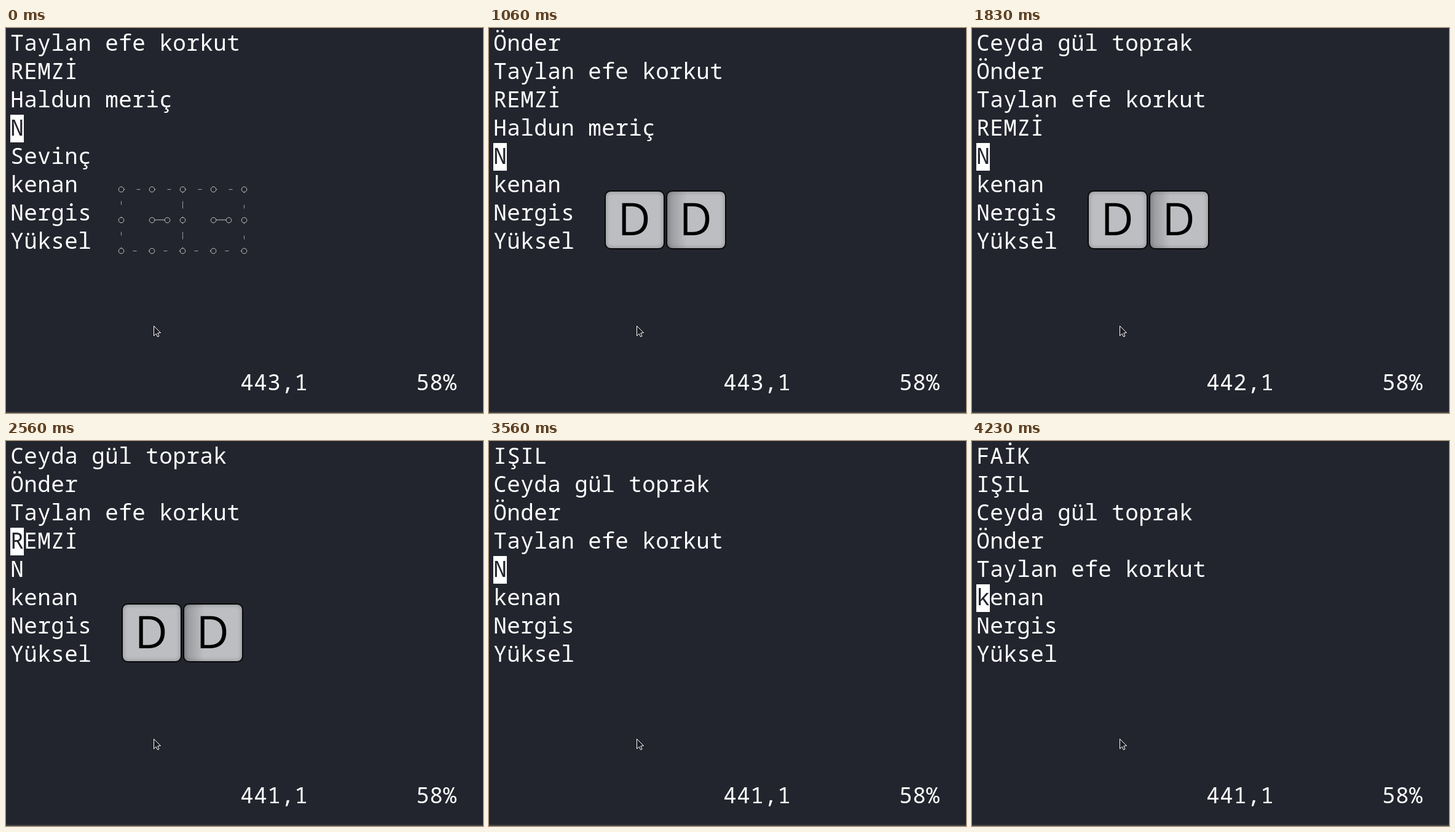
These frames come from a looping animation (776 by 626 pixels, 5110 ms). An HTML page with a canvas:

```html
<!DOCTYPE html>
<html lang="tr">
<head>
<meta charset="utf-8">
<title>Terminal editing</title>
<style>
html, body { margin: 0; width: 100%; height: 100%; overflow: hidden; background: #23252e; }
canvas { display: block; }
</style>
</head>
<body>
<canvas id="stage" width="776" height="626"></canvas>
<script>
const ctx = document.getElementById('stage').getContext('2d');
const LOOP = 5110, BG = '#23252e', FG = '#ffffff';
const CELL = 22, ROW = 46, LEFT = 7, TOP = 3, VISIBLE = 8, FIRST_LINE = 436;

const names = [
  'FAİK', 'IŞIL', 'Ceyda gül toprak', 'Önder', 'Taylan efe korkut', 'REMZİ',
  'Haldun meriç', 'N', 'Sevinç', 'kenan', 'Nergis', 'Yüksel'
];

const actions = {
  up: s => s.cursor--,
  down: s => s.cursor++,
  pending: s => s.command = 'd',
  remove: s => { s.lines.splice(s.cursor, 1); s.command = ''; },
  outline: s => s.overlay = drawOutline,
  keys: s => s.overlay = drawKeys,
  clear: s => s.overlay = null
};

const events = [
  [0, 'outline'], [70, 'clear', 'down'],
  [270, 'pending'], [460, 'remove'], [530, 'keys'],
  [1060, 'up'], [1200, 'up'], [1330, 'clear'],
  [1700, 'pending'], [1830, 'remove', 'keys'],
  [2560, 'up'], [2630, 'clear'],
  [2900, 'pending'], [3100, 'remove', 'keys'],
  [3560, 'clear'], [3630, 'pending'], [3760, 'remove'], [3830, 'keys'],
  [4230, 'clear']
];

function stateAt(time) {
  const state = { lines: [...names], cursor: 7, command: '', overlay: null };
  for (const [start, ...list] of events) {
    if (start > time) break;
    list.forEach(name => actions[name](state));
  }
  return state;
}

// Each character sits in the middle of its terminal cell.
function write(text, col, row, color = FG) {
  ctx.font = '36px "Noto Sans Mono", monospace';
  ctx.textAlign = 'center';
  ctx.textBaseline = 'alphabetic';
  ctx.fillStyle = color;
  [...text].forEach((ch, i) =>
    ctx.fillText(ch, LEFT + (col + i + 0.5) * CELL, TOP + row * ROW + 34));
}

function roundBox(x, y, w, h, r) {
  ctx.beginPath();
  ctx.roundRect(x, y, w, h, r);
}

function drawKey(x, shaded) {
  const y = 264;
  ctx.fillStyle = '#08080a';
  roundBox(x, y, 98, 96, 10);
  ctx.fill();

  ctx.save();
  roundBox(x + 2, y + 2, 94, 92, 8);
  ctx.fillStyle = '#bdbec2';
  ctx.fill();
  ctx.clip();
  if (shaded) {
    const shade = ctx.createLinearGradient(x + 2, 0, x + 34, 0);
    shade.addColorStop(0, 'rgba(0,0,0,.22)');
    shade.addColorStop(1, 'rgba(0,0,0,0)');
    ctx.fillStyle = shade;
    ctx.fillRect(x, y, 40, 96);
  }
  ctx.strokeStyle = 'rgba(40,40,45,.8)';
  ctx.shadowColor = 'rgba(0,0,0,.65)';
  ctx.shadowBlur = 6;
  ctx.lineWidth = 2;
  roundBox(x + 1, y + 1, 96, 94, 9);
  ctx.stroke();
  ctx.restore();

  ctx.font = '73px "Open Sans", sans-serif';
  ctx.textAlign = 'left';
  ctx.fillStyle = '#000';
  ctx.fillText('D', x + 21.5, y + 73);
}

function drawKeys() {
  drawKey(188, false);
  drawKey(288, true);
}

function drawOutline() {
  ctx.save();
  ctx.strokeStyle = '#a2a3a8';
  ctx.lineWidth = 1;
  ctx.setLineDash([6, 19]);
  for (const x of [187.5, 287.5]) ctx.strokeRect(x, 262.5, 100, 100);
  ctx.setLineDash([]);
  ctx.strokeStyle = '#c4c5c9';
  for (const x of [237.5, 337.5]) {
    ctx.beginPath();
    ctx.moveTo(x, 312);
    ctx.lineTo(x + 25, 312);
    ctx.stroke();
  }
  ctx.fillStyle = BG;
  const handle = (x, y) => {
    ctx.beginPath();
    ctx.arc(x, y, 4.3, 0, Math.PI * 2);
    ctx.fill();
    ctx.stroke();
  };
  for (let row = 0; row < 3; row++)
    for (let col = 0; col < 5; col++) handle(187.5 + col * 50, 262.5 + row * 50);
  handle(262.5, 312.5);
  handle(362.5, 312.5);
  ctx.restore();
}

function drawPointer() {
  ctx.save();
  ctx.translate(240.5, 484.5);
  ctx.beginPath();
  ctx.moveTo(0, 0);
  for (const [x, y] of [[0, 16], [3.7, 12.6], [6, 17.5], [8.5, 16.5], [6.3, 11.5], [11, 11]])
    ctx.lineTo(x, y);
  ctx.closePath();
  ctx.fillStyle = '#1c1d23';
  ctx.fill();
  ctx.strokeStyle = FG;
  ctx.lineWidth = 1;
  ctx.stroke();
  ctx.restore();
}

function draw(time) {
  const { lines, cursor, command, overlay } = stateAt(time);
  const first = lines.length - VISIBLE;
  ctx.fillStyle = BG;
  ctx.fillRect(0, 0, 776, 626);
  ctx.fillStyle = '#414245';
  ctx.fillRect(0, 624, 776, 2);

  lines.slice(first).forEach((line, row) => write(line, 0, row));
  const row = cursor - first;
  ctx.fillStyle = FG;
  ctx.fillRect(LEFT, TOP + row * ROW, CELL, 45);
  write(lines[cursor][0], 0, row, BG);

  write(command, 6, 12);
  write(`${FIRST_LINE + cursor},1`, 17, 12);
  write('58%', 30, 12);
  if (overlay) overlay();
  drawPointer();
}

const began = performance.now();
function tick() {
  draw((performance.now() - began) % LOOP);
  requestAnimationFrame(tick);
}
tick();
</script>
</body>
</html>
```
